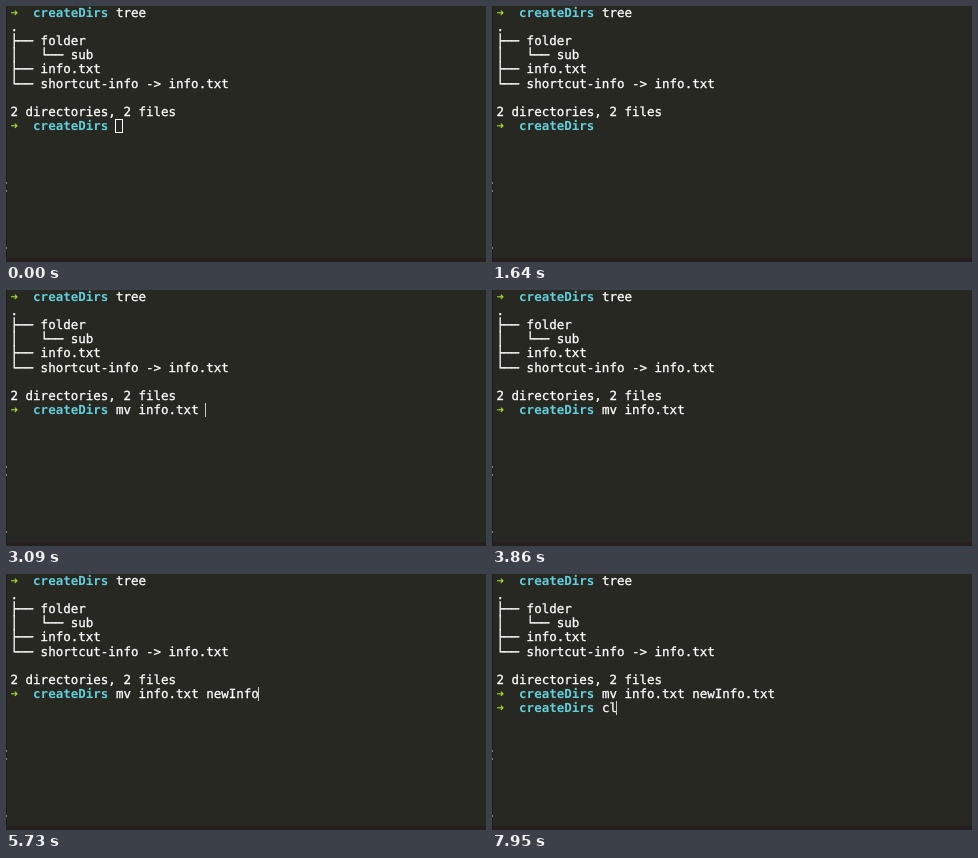
Write an HTML page with a canvas that moves like this. It is 480x256 px and loops after 8000 ms.

```html
<!DOCTYPE html>
<html lang="en">
<head>
<meta charset="utf-8">
<style>
html, body { margin: 0; width: 480px; height: 256px; overflow: hidden; background: #272822; }
canvas { display: block; }
</style>
</head>
<body>
<canvas id="stage" width="480" height="256"></canvas>
<script>
const ctx = document.getElementById('stage').getContext('2d');
const LOOP = 8000, LEFT = 4.5, BASE = 10.8, COL = 7.527, ROW = 14.15;
const FONT = '12.5px "DejaVu Sans Mono", monospace';
const WHITE = '#fff', GREEN = '#9fd832', CYAN = '#62cfdc';
const PROMPT_COL = 14, PROMPT_ROW = 8, FOCUS = 1230;

const output = [
  '.',
  '├── folder',
  '│   └── sub',
  '├── info.txt',
  '└── shortcut-info -> info.txt',
  '',
  '2 directories, 2 files'
];

// Typing bursts; no step means the text arrives at once (tab completion, Enter)
const bursts = [
  { text: 'mv i', start: 1690, step: 95 },
  { text: 'nfo.txt ', start: 2380 },
  { text: 'newI', start: 4380, step: 240 },
  { text: 'nfo', start: 5440, step: 100 },
  { text: '.txt', start: 5960, step: 220 },
  { text: '\n', start: 7300 },
  { text: 'cl', start: 7700, step: 160 }
];

function typed({ text, start, step }, t) {
  if (t < start) return '';
  return step ? text.slice(0, 1 + Math.floor((t - start) / step)) : text;
}

const colX = col => LEFT + col * COL;

function write(str, col, row, color = WHITE, bold = false) {
  const x = colX(col), y = BASE + row * ROW;
  ctx.font = (bold ? 'bold ' : '') + FONT;
  ctx.textRendering = 'geometricPrecision';
  ctx.fillStyle = ctx.strokeStyle = color;
  ctx.fillText(str, x, y);
  if (!bold) {
    // a thin outline gives the slightly heavier terminal weight
    ctx.lineWidth = 0.3;
    ctx.strokeText(str, x, y);
  }
}

function prompt(row, str) {
  write('➜', 0, row, GREEN, true);
  write('createDirs', 3, row, CYAN, true);
  write(str, PROMPT_COL, row);
}

function cursor(t, row, length) {
  const x = Math.round(colX(PROMPT_COL + length)) - 1;
  const y = Math.round(row * ROW);
  const blinkedOff = t < bursts[0].start || (t > 3450 && t < 3950);
  if (t < FOCUS) {
    ctx.strokeStyle = WHITE;
    ctx.lineWidth = 1;
    ctx.strokeRect(x + 0.5, y + 0.5, 7, 13);
  } else if (!blinkedOff) {
    ctx.fillStyle = '#c8c8c4';
    ctx.fillRect(x, y, 1, 14);
  }
}

function rect(color, x, y, w, h) {
  ctx.fillStyle = color;
  ctx.fillRect(x, y, w, h);
}

function background() {
  rect('#272822', 0, 0, 480, 256);
  rect('#251f20', 0, 252, 480, 4);
  rect('#1d1e1b', 0, 0, 1, 252);
  for (const y of [176, 184, 241]) rect('#85867f', 0, y, 1, 2);
}

function draw() {
  const t = performance.now() % LOOP;
  background();
  prompt(0, 'tree');
  output.forEach((line, i) => write(line, 0, i + 1));

  const lines = bursts.map(burst => typed(burst, t)).join('').split('\n');
  lines.forEach((line, i) => prompt(PROMPT_ROW + i, line));
  cursor(t, PROMPT_ROW + lines.length - 1, lines.at(-1).length);
  requestAnimationFrame(draw);
}
draw();
</script>
</body>
</html>
```
